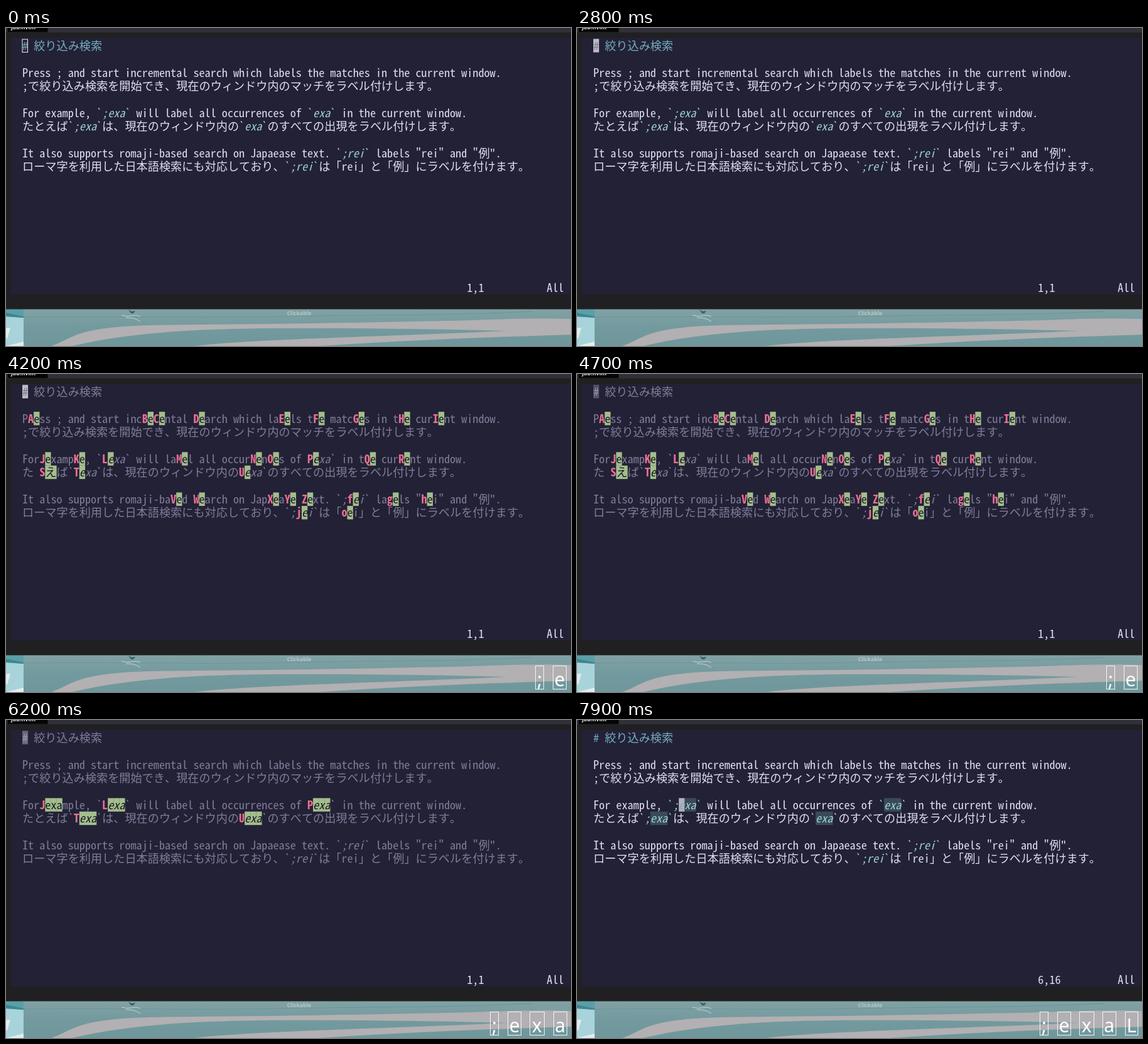
An HTML page for the animation above (8000 ms loop, 900x506 px).

```html
<!DOCTYPE html>
<html lang="ja">
<head>
<meta charset="utf-8">
<style>
  html, body { margin: 0; width: 100%; height: 100%; overflow: hidden; background: #201f22; }
  svg { display: block; width: 900px; height: 506px; }
  text { white-space: pre; }
  .term { font-family: "Noto Sans Mono CJK JP", "Noto Sans CJK JP", "Noto Sans Mono", monospace; fill: #e0def4; }
  .head { fill: #74adbf; font-weight: 500; }
  .code { fill: #9ccfd8; font-style: italic; }
  .tick { fill: #9ccfd8; }
  .dim text { fill: #807c99; }
  .dim .label { fill: #eb6f92; font-weight: bold; font-style: normal; }
  .dim .match { fill: #191724; }
  .bg-match { fill: #a3be8c; }
  .bg-found { fill: #3a4b58; }
  .caption { font: bold 8.6px "Noto Sans", sans-serif; fill: #b7c6c8; text-anchor: middle; }
  .tab { font: bold 9px "Noto Sans", sans-serif; fill: #e8e8e8; }
  .key { font: 30px "Noto Sans", sans-serif; fill: #fff; text-anchor: middle; }
  .box { fill: none; stroke: #f2f5f5; }
</style>
</head>
<body>
<svg viewBox="0 0 900 506">
  <defs>
    <linearGradient id="sea" x2="0" y2="1">
      <stop stop-color="#82a2a5"/>
      <stop offset=".5" stop-color="#739a9e"/>
      <stop offset="1" stop-color="#6f979b"/>
    </linearGradient>
  </defs>
  <!-- wallpaper -->
  <rect y="447" width="900" height="59" fill="url(#sea)"/>
  <path fill="#b2b0b2" d="M72 506C95 499 104 486 150 479C200 472 240 473 300 472C450 471 600 468 700 466
    C780 464 840 461 900 463V488C760 492 620 498 500 506H300C400 495 600 491 798 482
    C700 479 500 477 400 478C280 480 190 486 105 506Z"/>
  <path fill="none" stroke="#67979b" d="M28 460C180 458 300 462 440 459S700 458 840 451"/>
  <path fill="#2f6270" d="M195 448L200 451L206 450L203 454H199Z"/>
  <path fill="none" stroke="#c9d2d3" d="M184 457Q192 460 200 458T214 459M191 461Q204 460 214 467"/>
  <rect y="447" width="28" height="59" fill="#a8d3da"/>
  <path fill="#5a9fa8" d="M0 447H28V461L0 459Z"/>
  <path fill="#3f8690" d="M0 453L28 459V461L0 459Z"/>
  <path fill="#e4ecee" d="M0 477H7L2 494H0ZM0 506L28 499V506Z"/>
  <text class="caption" x="467" y="457">Clickable</text>

  <!-- window -->
  <rect width="900" height="447.5" fill="#201f22"/>
  <rect width="900" height="7" fill="#303038"/>
  <rect x="2.5" width="64" height="6.5" fill="#050506"/>
  <text class="tab" x="8" y="2">jab.nvim</text>
  <rect x="8" y="16" width="891" height="408" fill="#232136"/>

  <g id="page"></g>
  <g id="status"></g>
  <rect id="hollow" class="box" x="26" y="18" width="8.5" height="20.5"/>
  <g id="cursor"></g>
  <g id="keys"></g>
</svg>
<script>
const LOOP = 8000, FOCUS = 2000;
const CELL = 9.08, LINE = 21.4, LEFT = 26, TOP = 17.3, EM = CELL * 2;
const LABELS = "ABCDEFGHIJKLMNOPQRSTUVWXYZfghjo";
// time, character, box width
const KEYS = [[3100, ";", 14], [4100, "e", 22], [5000, "x", 23.5], [5900, "a", 21.5], [6700, "L", 20.5]];
const LINES = [
  "# 絞り込み検索", "",
  "Press ; and start incremental search which labels the matches in the current window.",
  ";で絞り込み検索を開始でき、現在のウィンドウ内のマッチをラベル付けします。", "",
  "For example, `;exa` will label all occurrences of `exa` in the current window.",
  "たとえば`;exa`は、現在のウィンドウ内の`exa`のすべての出現をラベル付けします。", "",
  "It also supports romaji-based search on Japaease text. `;rei` labels \"rei\" and \"例\".",
  "ローマ字を利用した日本語検索にも対応しており、`;rei`は「rei」と「例」にラベルを付けます。"
];

const $ = id => document.getElementById(id);
const px = col => LEFT + col * CELL;
const py = row => TOP + row * LINE;

// shrink Latin only when the half-width face is missing
const pen = document.createElement("canvas").getContext("2d");
pen.font = `100px "Noto Sans Mono CJK JP", "Noto Sans CJK JP", "Noto Sans Mono", monospace`;
const latin = Math.min(EM, CELL / pen.measureText("m").width * 100);

function parse(line, row) {
  let col = 0, code = false;
  return [...line].map(ch => {
    const tick = ch === "`";
    if (tick) code = !code;
    const wide = ch.charCodeAt(0) > 0x2e7f;
    const cell = { ch, col, wide, cls: row === 0 ? "head" : tick ? "tick" : code ? "code" : "" };
    col += wide ? 2 : 1;
    return cell;
  });
}
const rows = LINES.map(parse);

let count = 0;
const spots = rows.flatMap((cells, row) => cells.flatMap((c, i) =>
  "eえ".includes(c.ch) ? [{ row, i, label: LABELS[count++] }] : []));

function drawRow(cells, row) {
  let back = "", runs = [];
  for (const c of cells) {
    if (c.bg) back += `<rect class="bg-${c.bg}" x="${px(c.col)}" y="${py(row)}" width="${(c.wide ? 2 : 1) * CELL + .2}" height="${LINE}"/>`;
    const last = runs[runs.length - 1];
    if (last && last.cls === c.cls && last.wide === c.wide) {
      last.text += c.ch;
      last.xs.push(px(c.col).toFixed(2));
    } else runs.push({ cls: c.cls, wide: c.wide, text: c.ch, xs: [px(c.col).toFixed(2)] });
  }
  return back + runs.map(r =>
    `<text class="term ${r.cls}" font-size="${r.wide ? EM : latin}" x="${r.xs.join(" ")}" y="${Math.round(py(row) + 17.5)}">${r.text}</text>`).join("");
}

function drawPage(typed) {
  const view = rows.map(cells => cells.map(c => ({ ...c })));
  if (typed > 1 && typed < 5) {
    const query = "exa".slice(0, typed - 1);
    for (const { row, i, label } of spots) {
      const hit = LINES[row].startsWith(query, i) || (query === "e" && LINES[row][i] === "え");
      if (!hit) continue;
      for (let k = i; k < i + query.length; k++) {
        view[row][k].bg = "match";
        view[row][k].cls += " match";
      }
      const prev = view[row][i - 1];
      if (prev.wide) prev.col++;
      Object.assign(prev, { ch: label, wide: false, cls: "label" });
    }
  }
  if (typed === 5) LINES.forEach((line, row) => {
    for (const m of line.matchAll(/\bexa\b/g))
      for (let k = 0; k < 3; k++) view[row][m.index + k].bg = "found";
  });
  $("page").setAttribute("class", typed > 0 && typed < 5 ? "dim" : "");
  $("page").innerHTML = view.map(drawRow).join("");
}

function drawKeys(typed) {
  let right = 893, out = "";
  for (const [, ch, w] of KEYS.slice(0, typed).reverse()) {
    const x = Math.round(right - w) + .5;
    out += `<rect class="box" x="${x}" y="464.5" width="${Math.round(w) - 1}" height="37"/>` +
      `<text class="key" x="${x + w / 2 - .5}" y="497">${ch}</text>`;
    right -= w + 13.6;
  }
  $("keys").innerHTML = out;
}

function drawState(typed) {
  drawPage(typed);
  drawKeys(typed);
  const jumped = typed === 5;
  const status = parse(jumped ? "6,16" : "1,1", 18).map(c => ({ ...c, col: c.col + 78 }));
  const all = parse("All", 18).map(c => ({ ...c, col: c.col + 92 }));
  $("status").innerHTML = drawRow(status, 18) + drawRow(all, 18);
  const row = jumped ? 5 : 0, cell = rows[row][jumped ? 15 : 0];
  $("cursor").innerHTML =
    `<rect x="${px(cell.col)}" y="${py(row)}" width="${CELL}" height="${LINE}" fill="#e8e6f4"/>` +
    `<g>${drawRow([cell], row)}</g>`;
  $("cursor").querySelector("text").style.fill = "#191724";
}

// soft triangular blink
function blink(t) {
  const p = (((t - 4000) / 1400) % 1 + 1) % 1;
  return .25 + .75 * Math.abs(1 - 2 * p);
}

let shown = -1;
function frame(now) {
  const t = now % LOOP;
  const typed = KEYS.filter(k => t >= k[0]).length;
  if (typed !== shown) drawState(shown = typed);
  const active = t >= FOCUS, level = blink(t);
  $("hollow").style.display = active ? "none" : "";
  $("cursor").style.display = active ? "" : "none";
  const [block, glyph] = $("cursor").children;
  block.setAttribute("opacity", level.toFixed(3));
  glyph.setAttribute("opacity", (level ** 3).toFixed(3));
  requestAnimationFrame(() => frame(performance.now() - start));
}
const start = performance.now();
frame(0);
</script>
</body>
</html>
```
